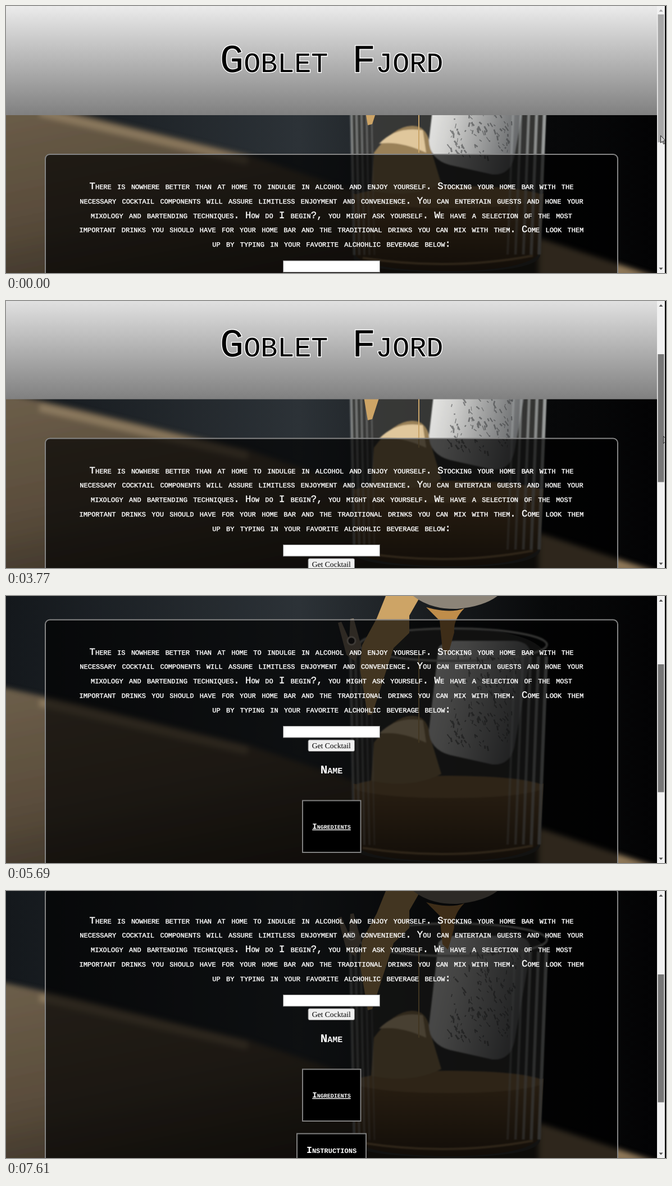
An HTML page that plays this animation: 1175x477 px, repeating every 8000 ms.

```html
<!DOCTYPE html>
<html lang="en">
<head>
<meta charset="utf-8">
<title>Goblet Fjord</title>
<style>
  html, body { margin: 0; height: 100%; overflow: hidden; background: #000; }
  svg { display: block; width: 100%; height: 100%; }
  text { text-anchor: middle; text-rendering: geometricPrecision; }
  .caps { font-family: "Liberation Mono", monospace; font-variant: small-caps; fill: #fff; }
  .title { font-size: 70.9px; fill: #000; stroke: #fff; stroke-width: 3px; paint-order: stroke; }
  .intro { font-size: 17.29px; stroke: #fff; stroke-width: .4px; }
  .bold { font-weight: bold; }
  .card { fill: #000; stroke: #808080; stroke-width: 2; }
  .field { stroke: #767676; }
  .line { fill: none; }
</style>
</head>
<body>
<svg viewBox="0 0 1175 477">
  <defs>
    <linearGradient id="wall">
      <stop offset="0" stop-color="#14181c"/>
      <stop offset=".45" stop-color="#2c3237"/>
      <stop offset=".83" stop-color="#08090a"/>
      <stop offset="1" stop-color="#030304"/>
    </linearGradient>
    <linearGradient id="wood" x2=".6" y2="1">
      <stop offset="0" stop-color="#6d5f4a"/>
      <stop offset=".5" stop-color="#594c3b"/>
      <stop offset="1" stop-color="#2c251d"/>
    </linearGradient>
    <linearGradient id="whisky" x2="0" y2="1">
      <stop offset="0" stop-color="#80603a"/>
      <stop offset="1" stop-color="#3a2b1b"/>
    </linearGradient>
    <linearGradient id="ice" x2="1" y2=".3">
      <stop offset="0" stop-color="#f2f2f0"/>
      <stop offset=".35" stop-color="#d2d2d0"/>
      <stop offset="1" stop-color="#66686a"/>
    </linearGradient>
    <linearGradient id="header" x2="0" y2="1">
      <stop offset="0" stop-color="#ebebeb"/>
      <stop offset="1" stop-color="#808080"/>
    </linearGradient>
    <filter id="blur" x="-20%" width="140%"><feGaussianBlur stdDeviation="5"/></filter>
    <filter id="soft"><feGaussianBlur stdDeviation="1.2"/></filter>
  </defs>

  <!-- fixed backdrop: table, glass, ice, peel and pour -->
  <rect width="1159" height="477" fill="url(#wall)"/>
  <g filter="url(#blur)">
    <path d="M-20 160L130 193L430 266L640 338L960 420V500H-20Z" fill="url(#wood)"/>
    <path class="line" d="M60 190L430 276" stroke="#9a8768" stroke-width="14" opacity=".7"/>
    <path d="M950 415L1160 484H950Z" fill="#8f7858"/>
  </g>
  <path d="M612 95Q640 58 790 57Q950 60 965 112L951 446Q945 474 790 476Q630 474 619 452Z" fill="#3d3d3a" opacity=".85"/>
  <path d="M618 335Q790 375 957 335L951 440Q930 472 790 474Q640 472 622 445Z" fill="url(#whisky)"/>
  <g filter="url(#soft)">
    <ellipse cx="788" cy="341" rx="168" ry="20" fill="#8e7048"/>
    <path d="M655 262Q690 215 722 214Q752 212 757 258L775 318Q720 345 650 330Z" fill="#9a8159"/>
    <path d="M664 246Q695 214 742 222L748 262Q700 240 664 246Z" fill="#e0c79c"/>
    <path d="M770 92Q780 80 800 80H905Q934 82 934 106L905 270Q897 303 866 301L790 284Q754 274 753 240Z" fill="url(#ice)"/>
    <g id="glass" class="line" stroke="#b8bcbc"></g>
    <ellipse class="line" cx="796" cy="87" rx="167" ry="29" stroke="#9a9a96" stroke-width="4"/>
    <path class="line" d="M635 450Q790 474 938 446" stroke="#91734d" stroke-width="4"/>
  </g>
  <g id="frost" class="line" stroke="#303234" opacity=".5"></g>
  <path d="M735 100V262" stroke="#c9a468" stroke-width="2"/>
  <path d="M676 0H738L718 35V66L690 93L652 211L644 213L630 130L634 88L660 40Z" fill="#cda466"/>
  <path d="M591 48L597 46L611 78L613 41L619 40L632 88L622 117L606 105Z" fill="#91806d"/>
  <circle cx="615" cy="80" r="7" fill="#292725" stroke="#c0b6a8" stroke-width="3"/>
  <path d="M725 0Q755 24 803 23Q850 19 875 0Z" fill="#8c8478"/>
  <path d="M748 20Q790 32 816 22Q796 42 798 65L787 105L777 95L772 44Z" fill="#c08d4a"/>

  <!-- scrolled content -->
  <g id="page">
    <rect width="1159" height="195" fill="url(#header)"/>
    <text class="caps title" x="579.5" y="118">Goblet Fjord</text>
    <rect x="70" y="265" width="1019" height="700" rx="8" fill="#000" fill-opacity=".68" stroke="#858585" stroke-width="2"/>
    <g id="intro"></g>
    <rect class="field" x="493.5" y="455" width="172" height="20.5" fill="#fff"/>
    <rect class="field" x="538" y="479.5" width="82.5" height="20.5" rx="2.5" fill="#efefef"/>
    <text x="579.3" y="494" font-family="'Liberation Serif', serif" font-size="13.6">Get Cocktail</text>
    <text class="caps bold" x="579.5" y="539" font-size="21">Name</text>
    <rect class="card" x="528" y="588" width="103.5" height="92.5"/>
    <text class="caps bold" x="579.5" y="638.5" font-size="14.2" text-decoration="underline">Ingredients</text>
    <rect class="card" x="518" y="703" width="123" height="92.5"/>
    <text class="caps bold" x="579.5" y="737" font-size="16.7">Instructions</text>
  </g>

  <!-- scrollbar and pointer -->
  <rect x="1159" width="14" height="477" fill="#f1f1f1"/>
  <path id="up" d="M1162.5 10L1166 6L1169.5 10Z"/>
  <path d="M1162.5 467.5L1166 471.5L1169.5 467.5Z" fill="#505050"/>
  <rect id="thumb" x="1160.5" width="11" height="228.5"/>
  <path id="pointer" d="M.5 .5V13.5L3.5 10.8L5.6 15.6L7.5 14.8L5.4 10H9.5Z" fill="#d0d0d0" stroke="#222"/>
  <rect x="1173" width="2" height="477"/>
</svg>
<script>
const $ = id => document.getElementById(id);
const LOOP = 8000;
const repeat = (n, make) => Array.from({ length: n }, (_, i) => make(i)).join("");

const lines = [
  "There is nowhere better than at home to indulge in alcohol and enjoy yourself. Stocking your home bar with the",
  "necessary cocktail components will assure limitless enjoyment and convenience. You can entertain guests and hone your",
  "mixology and bartending techniques. How do I begin?, you might ask yourself. We have a selection of the most",
  "important drinks you should have for your home bar and the traditional drinks you can mix with them. Come look them",
  "up by typing in your favorite alchohlic beverage below:"
];
$("intro").innerHTML = repeat(lines.length, i =>
  `<text class="caps intro" x="579.5" y="${327.2 + i * 25.75}">${lines[i]}</text>`);

let seed = 7;
const rand = () => (seed = seed * 16807 % 2147483647) / 2147483647;

// Reflections run down both walls of the glass, fading inwards
$("glass").innerHTML = repeat(5, i => {
  const fade = .75 - i * .1, width = 5 - i * .5;
  return `<path d="M${613 + i * 9} 100l7 345" stroke-width="${width}" opacity="${fade * .7}"/>
    <path d="M${962 - i * 14} 108l-13 336" stroke-width="${width + 1}" opacity="${fade}"/>`;
});

// Cracks in the right half of the ice cube
$("frost").innerHTML = repeat(160, () => {
  const y = 105 + rand() * 165, x = 915 - rand() ** 1.4 * 110 - (y - 100) * .14;
  return `<path d="M${x} ${y}l${rand() * 8 - 2} ${2 + rand() * 7}" stroke-width="${1 + rand() * 2}"/>`;
});

// The screen repaints only at these moments
const repaints = [0, 260, 510, 840, 950, 1290, 1320, 1750, 2050, 2250, 2385, 2520, 2690, 2860, 3240, 3500,
  3640, 3705, 3770, 3910, 4170, 4460, 4630, 4830, 4910, 5250, 5690, 5800, 6310, 6620, 6860, 7020, 7610];

// Key points [ms, values...], joined by straight moves
const scroll = [[3600, 0], [3770, 19.5], [3910, 160], [4460, 172], [4910, 172], [5690, 222.5],
  [6620, 230], [7610, 269.5]];
const thumb = [[3600, 15], [3770, 95], [4630, 96], [4910, 104], [5690, 122], [6310, 124], [6620, 133], [7610, 149]];
const pointer = [[260, 1165, 231], [510, 884, 93], [950, 633, -6], [1320, 1130, 120], [1750, 1137, 126],
  [2050, 1145, 133], [2520, 1161, 159], [2690, 1190, 170], [2860, 1190, 211], [3240, 1166, 211],
  [3500, 1167, 200], [3770, 1170, 241], [4460, 1170, 241], [4630, 1190, 241]];

function at(keys, t) {
  const i = keys.findIndex(key => key[0] > t);
  if (i < 1) return keys.at(i).slice(1);
  const a = keys[i - 1], b = keys[i], k = (t - a[0]) / (b[0] - a[0]);
  return a.map((v, j) => v + (b[j] - v) * k).slice(1);
}

function draw(now) {
  const t = repaints.findLast(ms => ms <= now % LOOP);
  const [top] = at(scroll, t), [y] = at(thumb, t), [px, py] = at(pointer, t);
  const hover = px >= 1157 && px < 1173;
  $("page").setAttribute("transform", `translate(0 ${-top})`);
  $("thumb").setAttribute("y", y);
  $("thumb").setAttribute("fill", top ? "#787878" : hover ? "#a8a8a8" : "#c1c1c1");
  $("up").setAttribute("fill", top ? "#505050" : "#a3a3a3");
  $("pointer").setAttribute("transform", `translate(${px} ${py})`);
}

const start = performance.now();
function tick() {
  draw(performance.now() - start);
  requestAnimationFrame(tick);
}
tick();
</script>
</body>
</html>
```
